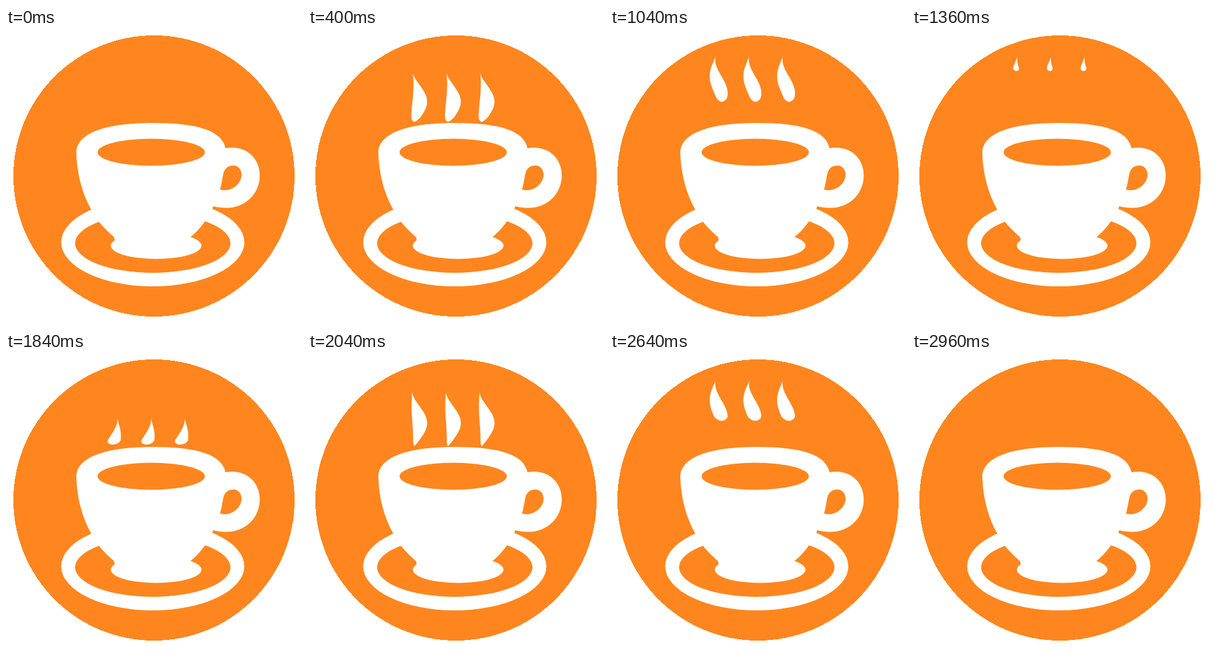
Write an HTML page that moves like this. It is 480x480 px and loops after 3 s.

```html
<!DOCTYPE html>
<html lang="en">
<head>
<meta charset="utf-8">
<title>Steaming cup</title>
<style>
  html, body { margin: 0; width: 100%; height: 100%; overflow: hidden; background: #fff; }
  svg { display: block; width: 100vw; height: 100vh; }
  .orange { fill: #ff861e; }
  .white { fill: #fff; }
</style>
</head>
<body>
<svg viewBox="0 0 480 480">
  <circle class="orange" cx="240" cy="240" r="228" shape-rendering="crispEdges"/>
  <ellipse class="white" cx="238" cy="347.5" rx="148.5" ry="71.5"/>
  <ellipse class="orange" cx="238" cy="349" rx="126" ry="48"/>
  <ellipse class="white" cx="243.5" cy="353" rx="73.5" ry="21.5"/>
  <path class="white" d="M114 203C114 170 162 154 238 154C310 154 350 166 356 195
    C388 189 411.5 210 411.5 239C411.5 272 382 301 336 289L334 295
    C325 312 313 328 299 339L300 350L178 350L175 339C160 326 147 312 138 294C123 268 115 235 114 203Z"/>
  <path class="orange" d="M347 262C350 252 351 242 353 234C356 226 362 223 369 223
    C377 223 382 230 382 238C382 253 365 267 347 262Z"/>
  <ellipse class="orange" cx="235.5" cy="201.5" rx="87" ry="22"/>
  <path id="wisp" class="white"/>
  <use href="#wisp" x="54.6"/>
  <use href="#wisp" x="109.2"/>
</svg>
<script>
const LOOP = 3000, STEP = 40, SECOND = 1600;
const PEAK = 46, LENGTH = 97, WIDTH = 24, CAP = 8, SAMPLES = 48;

// Every wisp slides up along the same fixed wave.
const spine = y => 175 - 6.3 * Math.cos(Math.PI * (y - 62) / 55);

// Half width: thin at the tip and tail, with a rounded lower end.
function halfWidth(y, top, bottom) {
  const along = Math.min((y - top) / LENGTH, 1);
  const body = WIDTH / 2 * Math.sin(Math.PI * along) ** 1.6;
  const cap = Math.max(0, 1 - (bottom - y) / CAP);
  return body * Math.sqrt(1 - cap * cap);
}

// The tip rises from the cup, then the lower end is eaten away upwards.
function extent(t, end) {
  const top = Math.max(PEAK, 150 - 0.2125 * (t - 40));
  const fade = Math.min(1, Math.max(0, (t - 640) / (end - 640)));
  const foot = Math.min(147 + t / 80, top + LENGTH);
  return [top, foot - (LENGTH + 2) * fade ** 1.95];
}

function outline(top, bottom) {
  if (bottom <= top) return "";
  const left = [], right = [];
  for (let i = 0; i <= SAMPLES; i++) {
    // Samples crowd together at the lower end to keep its curve smooth.
    const y = top + (bottom - top) * Math.sin(Math.PI / 2 * i / SAMPLES);
    const x = spine(y), half = halfWidth(y, top, bottom);
    left.unshift([x - half, y]);
    right.push([x + half, y]);
  }
  return `M${[...right, ...left].join("L")}Z`;
}

const wisp = document.getElementById("wisp");
const start = performance.now();

function draw() {
  const t = Math.floor((performance.now() - start) % LOOP / STEP) * STEP;
  // The second puff clears a little sooner than the first.
  const range = t < SECOND ? extent(t, 1480) : extent(t - SECOND, 1360);
  wisp.setAttribute("d", outline(...range));
  requestAnimationFrame(draw);
}
draw();
</script>
</body>
</html>
```
